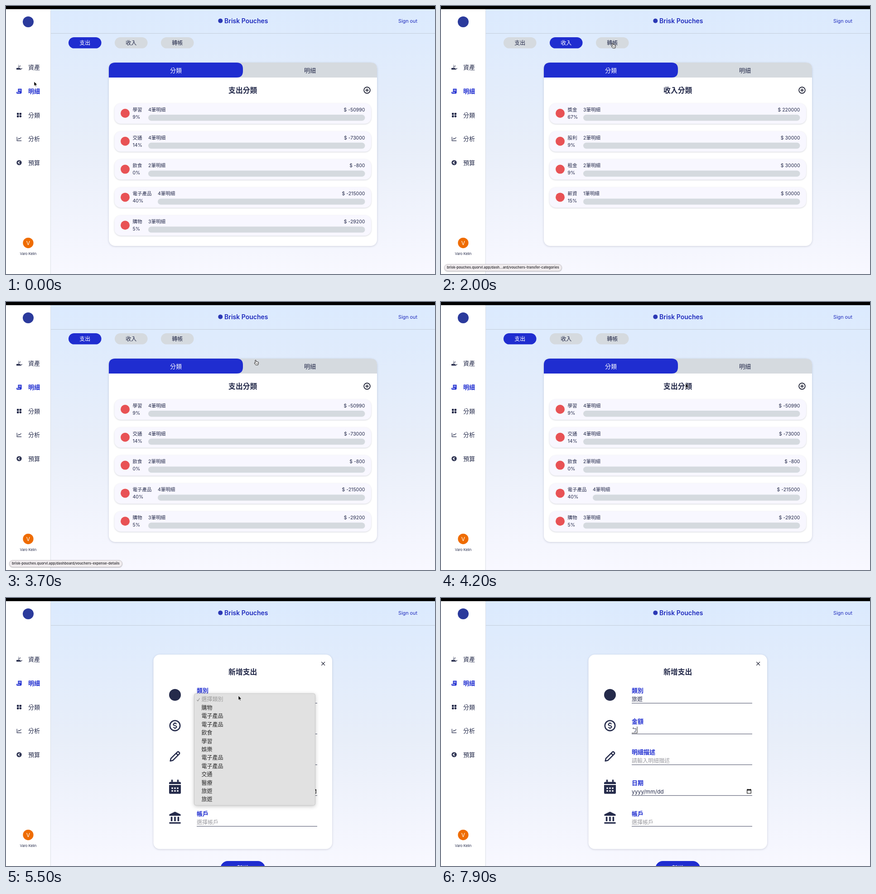
An HTML page that plays this animation: 947 px wide and 592 px high, repeating every 8 s.

```html
<!DOCTYPE html>
<html lang="zh-TW">
<head>
<meta charset="utf-8">
<style>
html, body { margin: 0; width: 100%; height: 100%; overflow: hidden; background: #f8f8ff; }
svg { position: absolute; left: 0; top: 0; }
svg, #status { font-family: Inter, "Noto Sans CJK TC", "Noto Sans CJK", sans-serif; }
.card { fill: #fff; filter: drop-shadow(0 1.5px 2px rgba(40, 50, 80, .2)); }
.row { fill: #f8f7ff; filter: drop-shadow(0 1.5px 1.5px rgba(40, 50, 80, .2)); }
.popup { fill: #e1e1e1; stroke: #bdbdbd; stroke-width: .7; filter: drop-shadow(0 2px 4px rgba(0, 0, 0, .22)); }
#status {
  position: absolute; left: 6.5px; top: 570px; height: 14px; line-height: 14.5px; padding: 0 5.5px;
  border: 1px solid #c8c4c8; border-radius: 8px; background: #f0ecee; color: #3c3b40;
  font-size: 7.6px; font-weight: 600; white-space: nowrap; box-shadow: 0 1px 2px rgba(0, 0, 0, .2);
}
</style>
</head>
<body>
<svg width="947" height="592" viewBox="0 0 947 592">
  <defs>
    <linearGradient id="sky" x1="0" y1="0" x2="0" y2="1">
      <stop offset="0" stop-color="#dbeafe"/>
      <stop offset=".53" stop-color="#e8eef9"/>
      <stop offset="1" stop-color="#f8f8ff"/>
    </linearGradient>
  </defs>
  <g id="frame"></g>
  <g id="page"></g>
  <g id="cursor"></g>
</svg>
<div id="status"></div>
<script>
const BLUE = '#1f2dd0', INK = '#252b4b', GREY = '#d5dadf', FAINT = '#9c9ca2';
const el = id => document.getElementById(id);

// Text placed by the vertical centre of its line.
const text = (x, cy, s, size, fill = INK, weight = 400, anchor = 'start') =>
  `<text x="${x}" y="${cy + size * .37}" font-size="${size}" fill="${fill}" font-weight="${weight}" text-anchor="${anchor}">${s}</text>`;
const mid = (x, cy, s, size, fill, weight) => text(x, cy, s, size, fill, weight, 'middle');
const rect = (x, y, w, h, r, fill, more = '') =>
  `<rect x="${x}" y="${y}" width="${w}" height="${h}" rx="${r}" fill="${fill}" ${more}/>`;
const disc = (x, y, r, fill) => `<circle cx="${x}" cy="${y}" r="${r}" fill="${fill}"/>`;
const line = (d, width, stroke = INK, more = '') =>
  `<path d="${d}" fill="none" stroke="${stroke}" stroke-width="${width}" ${more}/>`;
const shape = (d, fill = INK) => `<path d="${d}" fill="${fill}"/>`;
const at = (x, y, s) => `<g transform="translate(${x} ${y})">${s}</g>`;

// Navigation icons, drawn around their own centre.
const nav = [
  ['資產', shape('M-6 1.5h2.4q2-1.3 3.8 0h2q1 .6 0 1.4h2l2.3-1.6q1 .2.3 1.2L3.8 5H-6z') +
    disc(-.5, -1.2, 1.2, INK) + disc(2, -3, 1, INK) + disc(-1.3, -4.6, .8, INK)],
  ['明細', shape('M-2.5-5.5H5.5V3.4Q5.3 5.5 3.4 5.5H-4Q-6 5.3-6 3.2V1.6H-2.5z', BLUE) +
    line('M-.8-3H3.7M-.8-.8H3.7M-4.6 2.9H1.5V4', 1, '#fff')],
  ['分類', rect(-5, -4.8, 4.4, 4.4, .8, INK) + rect(.7, -4.8, 4.4, 4.4, .8, INK) +
    rect(-5, .7, 4.4, 4.4, .8, INK) + disc(2.9, 2.9, 2.4, INK)],
  ['分析', line('M-4.8-4.5V4.2H5.2M-3 1.8L-.6-1.2 1 .3 4.6-3.2', 1.1)],
  ['預算', disc(0, 0, 5.6, INK) +
    line('M2.2-2.3Q-1.7-4-1.7 0T2.2 2.3M-3-.7H1.2M-3 .8H1.2', 1, '#fff')],
];

el('frame').innerHTML =
  rect(0, 0, 947, 592, 0, 'url(#sky)') + rect(0, 0, 98, 592, 0, '#fff') +
  line('M98.5 7V592', 1, '#d9dee6') + line('M99 60.5H947', 1, '#c3cedb') +
  rect(0, 0, 947, 7, 0, '#000') +
  disc(49, 35, 12, '#2b3a9c') + disc(473.3, 32.7, 5, '#2b38b5') +
  text(482, 32.7, 'Brisk Pouches', 14, '#1f2bbd', 600) +
  text(908, 33, 'Sign out', 10.8, '#1f2bbd', 400, 'end') +
  nav.map(([name, icon], i) => {
    const y = 135.6 + i * 52.6, on = i === 1;
    return at(29, y, icon) + text(49, y, name, 13, on ? BLUE : INK, on ? 700 : 500);
  }).join('') +
  disc(49, 523.3, 11.6, '#ef6c00') + mid(49, 523.3, 'V', 12, '#fff') +
  mid(49, 547, 'Varo Kelin', 7.7);

// Each row: label, percentage, count, amount.
const lists = {
  支出: [['學習', 9, 4, -50990], ['交通', 14, 4, -73000], ['飲食', 0, 2, -800],
    ['電子產品', 40, 4, -215000], ['購物', 5, 3, -29200]],
  收入: [['獎金', 67, 3, 220000], ['股利', 9, 2, 30000], ['租金', 9, 2, 30000], ['薪資', 15, 1, 50000]],
  轉帳: [],
};
const kinds = Object.keys(lists);
const slugs = ['expense', 'income', 'transfer'];
const tabs = ['分類', '明細'];

function row([label, share, count, sum], i) {
  const x = label.length > 2 ? 335 : 314;
  return at(0, i * 61.8,
    rect(239.5, 215, 566.5, 45, 14, '#f8f7ff', 'class="row"') + disc(263, 237, 10, '#e85255') +
    text(279.5, 229, label, 10.5) + text(279.5, 245, share + '%', 10.5) +
    text(x, 229, count + '筆明細', 10.5) + text(792.5, 229, '$ ' + sum, 10.5, INK, 400, 'end') +
    rect(x, 240, 792.5 - x, 13.4, 6.7, GREY));
}

function listPage(kind, tab) {
  const name = kinds[kind];
  const pills = kinds.map((k, i) => rect(138 + i * 102, 69, 72.5, 24.6, 12.3, i === kind ? BLUE : GREY) +
    mid(174.2 + i * 102, 81.4, k, 12, i === kind ? '#fff' : INK, 500));
  const active = tab
    ? 'M537 125H805Q819 125 819 139V158H537Q523 158 523 144V139Q523 125 537 125z'
    : 'M241 125H509Q523 125 523 139V144Q523 158 509 158H227V139Q227 125 241 125z';
  return pills.join('') +
    rect(227, 125, 592, 405, 14, '#fff', 'class="card"') +
    shape('M227 158V139Q227 125 241 125H805Q819 125 819 139V158z', GREY) + shape(active, BLUE) +
    tabs.map((s, i) => mid(375 + i * 296, 141.7, s, 13, i === tab ? '#fff' : INK, 500)).join('') +
    mid(522.7, 186.3, name + tabs[tab], 15.8, INK, 700) +
    at(797, 186, '<circle r="6.9" fill="none" stroke="#15182c" stroke-width="1.6"/>' +
      line('M-3.8 0H3.8M0-3.8V3.8', 1.6, '#15182c')) +
    (tab ? '' : lists[name].map(row).join(''));
}

const dots = [-6, 0, 6].map(x => [1, 7].map(y => rect(x - 1.7, y - 1.7, 3.4, 3.4, .7, '#fff')).join('')).join('');
const formIcons = [
  disc(0, 0, 13, INK),
  '<circle r="11.2" fill="none" stroke="#252b4b" stroke-width="2.6"/>' +
    line('M3.6-3.2Q2.8-5 0-5-3.6-5-3.6-2.5-3.6-.5 0 0 3.6.5 3.6 2.5 3.6 5 0 5-2.8 5-3.6 3.2M0-7.3V-5M0 5V7.3', 2),
  line('M-10.3 10.3L-9 4.6 5.2-9.4Q7-11 8.8-9.2L9.4-8.6Q11-6.8 9.2-5L-4.8 9z', 2.5, INK, 'stroke-linejoin="round"') +
    line('M2.6-6.6L6.6-2.6', 2.5),
  shape('M-10.5-11.5H10.5Q13-11.5 13-9V-6.6H-13V-9Q-13-11.5-10.5-11.5zM-13-4.6H13V12Q13 14.8 10.5 14.8H-10.5Q-13 14.8-13 12z') +
    line('M-6.5-15V-10M6.5-15V-10', 3.4, INK, 'stroke-linecap="round"') + at(0, 1.4, dots),
  shape('M0-13.5L12.5-7.6V-4.6H-12.5V-7.6zM-12.5 9.6H12.5V13H-12.5z') +
    line('M-7.4-2.4V7.4M0-2.4V7.4M7.4-2.4V7.4', 3.6),
];
const options = ['選擇類別', '購物', '電子產品', '電子產品', '飲食', '學習', '娛樂', '電子產品', '電子產品',
  '交通', '醫療', '旅遊', '旅遊'];

function formPage(t, cursorY) {
  const chosen = t >= 6300, typed = t >= 7800;
  const fields = [
    ['類別', chosen ? '旅遊' : '選擇類別', chosen],
    ['金額', typed ? 'ㄅ' : '0', typed],
    ['明細描述', '請輸入明細描述'],
    ['日期', 'yyyy/mm/dd', true],
    ['帳戶', '選擇帳戶'],
  ];
  let s = rect(325.5, 125, 394.5, 429.5, 14, '#fff', 'class="card"') +
    line('M696.4 141.2l7.6 7.6m0-7.6l-7.6 7.6', 1.2, '#15182c') +
    mid(522.7, 163.4, '新增支出', 15.8, INK, 700) +
    rect(473.5, 581, 98.5, 32, 16, BLUE) + mid(522.7, 596.5, '新增', 13, '#fff', 500);
  fields.forEach(([label, value, filled], i) => {
    const y = 204.6 + i * 68;
    s += at(373, 214 + i * 67.9, formIcons[i].replace(/#252b4b/g, INK)) +
      text(421, y, label, 13, BLUE, 700) +
      text(421, y + 19, value, 12, filled ? INK : FAINT) +
      line(`M421 ${Math.round(y + 27.8) + .3}H687`, 1, '#434862');
  });
  s += line('M675.7 423.3H684.3V431.5H675.7zM677.6 421.6V424M682.4 421.6V424', 1.2, '#111') +
    rect(675.4, 422.8, 9.2, 2.4, 0, '#111');
  if (typed) s += line('M421 298.3H433', 1, '#333');
  if (typed || t >= 7000 && t < 7500) s += line(`M${typed ? 433 : 421.5} 284V298.5`, 1, '#222');
  if (t >= 5500 && !chosen) s += dropdown(cursorY);
  return s;
}

function dropdown(cursorY) {
  const hover = Math.round((cursorY - 224) / 18.4);
  return rect(415.5, 211, 267, 247, 4, '#e1e1e1', 'class="popup"') +
    options.map((name, i) => {
      const y = 224 + i * 18.42, on = i > 0 && i === hover;
      return (on ? rect(419, y - 9, 260, 18, 3, '#2f6fe0') : '') +
        text(431.5, y, name, 12, on ? '#fff' : i ? '#262626' : '#9a9a9a');
    }).join('') + line('M421.5 225.2l2 2.3 4-6', 1.1, '#8c8c8c');
}

// Pointer tip: time, x, y.
const path = [[0, 62, 167], [500, 130, 135], [900, 230, 101], [1150, 274, 83], [1500, 277, 82],
  [1900, 372, 82], [2000, 379, 82], [2200, 381, 83], [2500, 200, 84], [2600, 174, 82], [2800, 176, 83],
  [3300, 400, 126], [3700, 551, 128], [3800, 570, 136], [4000, 480, 138], [4200, 540, 180],
  [4300, 560, 200], [4400, 560, 200], [4900, 795, 180], [5100, 795, 180], [5400, 530, 212],
  [5500, 513, 216], [6000, 487, 441], [6200, 487, 441], [6500, 487, 333], [6800, 468, 288], [8000, 468, 288]];

function pointer(t) {
  const i = path.findIndex(p => p[0] > t), [t0, x0, y0] = path[i - 1], [t1, x1, y1] = path[i];
  const k = (t - t0) / (t1 - t0);
  return [x0 + (x1 - x0) * k, y0 + (y1 - y0) * k];
}

const outline = 'stroke-linejoin="round" stroke-linecap="round"';
const pointers = {
  arrow: `<path d="M0 0V9.6L2.2 7.6 3.8 11 5.3 10.3 3.8 7.1H6.8z" fill="#000" stroke="#fff" stroke-width=".7" ${outline}/>`,
  hand: `<path d="M-1 .8Q0-.6 1 .8V4Q2 3 3 4.2 4 3.4 5 4.7 6.6 4.3 6.6 6L6 9.2 5.2 11.2H.3L-2.8 7.2Q-3.3 5.6-1 6.8z" fill="#fff" stroke="#111" stroke-width=".9" ${outline}/>` +
    line('M1.2 7V9.3M2.9 7V9.3M4.5 7V9.3', .6, '#111'),
  beam: line('M-2-6Q0-6 0-4.5 0-6 2-6M0-4.5V4.5M-2 6Q0 6 0 4.5 0 6 2 6', 1, '#111'),
};

// Page slug of the link under the pointer.
function linkAt(x, y, kind) {
  const i = Math.floor((x - 138) / 102);
  if (y > 69 && y < 94 && i >= 0 && i < 3 && x - 138 - i * 102 < 72.5) return slugs[i] + '-categories';
  if (y > 125 && y < 158 && x > 227 && x < 819) return slugs[kind] + (x < 523 ? '-categories' : '-details');
}

function set(id, html) {
  const node = el(id);
  if (node.last !== html) node.innerHTML = node.last = html;
}

function draw(now) {
  const t = Math.floor(now % 8000 / 100) * 100;
  const [x, y] = pointer(t);
  const form = t >= 5100;
  const kind = t < 1300 || t >= 2600 ? 0 : t < 2200 ? 1 : 2;
  const tab = t >= 3800 && t < 4000 ? 1 : 0;
  const link = form ? '' : linkAt(x, y, kind);
  const onPlus = !form && Math.hypot(x - 797, y - 186) < 9;
  const look = link || onPlus ? 'hand' : t >= 6700 ? 'beam' : 'arrow';

  set('page', form ? formPage(t, y) : listPage(kind, tab));
  set('cursor', t < 7000 ? at(x, y, pointers[look]) : '');
  el('status').style.display = link ? 'block' : 'none';
  const folder = link && link.startsWith('transfer') ? 'dash...ard' : 'dashboard';
  set('status', link ? `brisk-pouches.quorvl.app/${folder}/vouchers-${link}` : '');
}

const start = performance.now();
(function tick() {
  draw(performance.now() - start);
  requestAnimationFrame(tick);
})();
</script>
</body>
</html>
```
